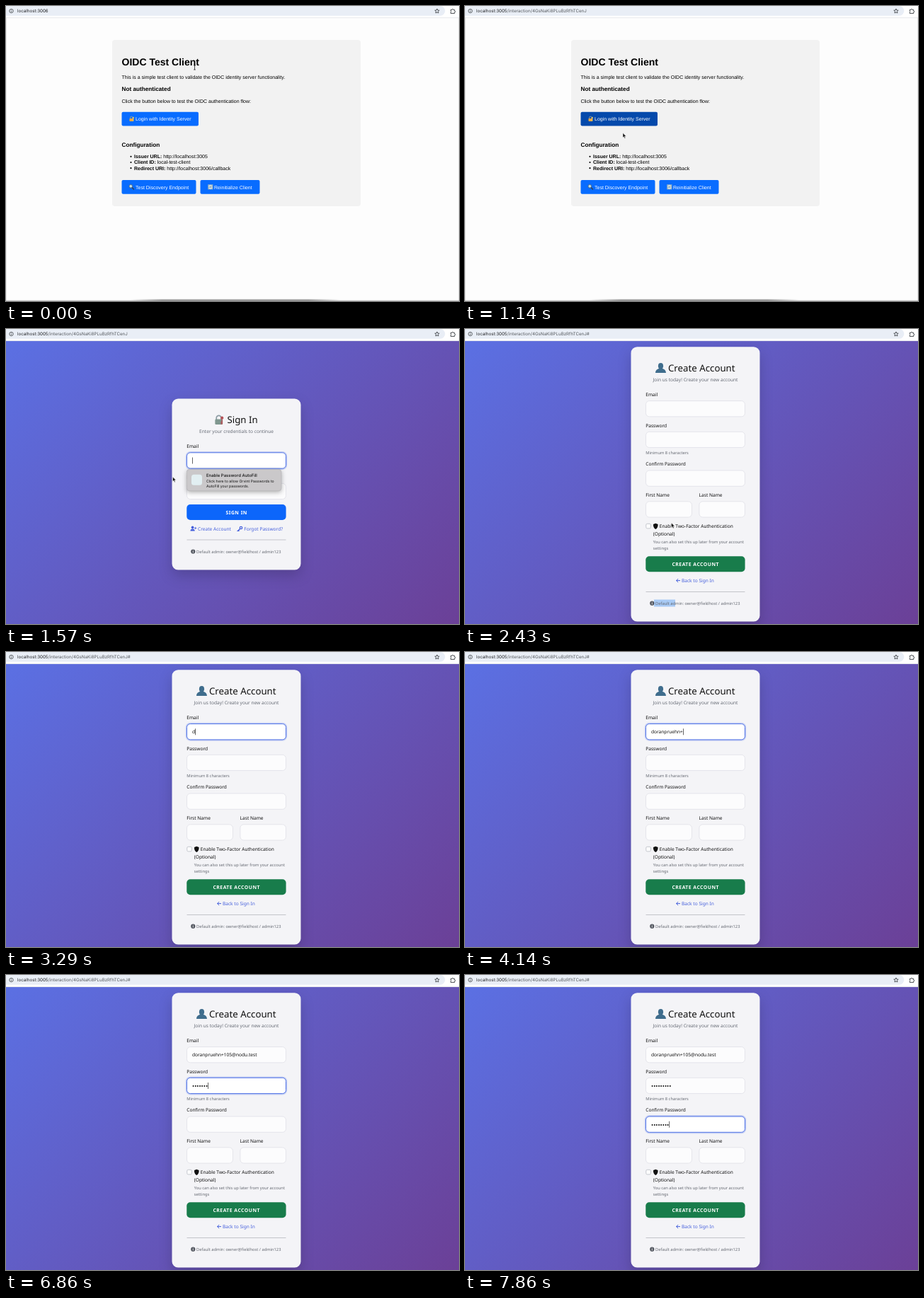
An HTML page that plays this animation: 640x417 px, repeating every 8000 ms.

```html
<!DOCTYPE html>
<html lang="en">
<head>
<meta charset="utf-8">
<title>Login flow</title>
<style>
  html, body { margin: 0; width: 100%; height: 100%; overflow: hidden; background: #fdfdfd; }
  svg { display: block; width: 100vw; height: 100vh; }
  text { text-rendering: geometricPrecision; white-space: pre; }
  .bar { font: 6.2px Inter, sans-serif; fill: #1f2124; }
  .bar tspan { fill: #55595e; }
  #client { font: 7px "Liberation Sans", Arial, sans-serif; fill: #000; }
  #client .h1 { font-size: 14px; font-weight: 700; }
  #client .h3 { font-size: 8.2px; font-weight: 700; }
  #client .btn text { fill: #fff; }
  .btn rect { fill: #086cff; }
  #login.hot rect { fill: #0449ab; }
  b, .b { font-weight: 700; }
  .form { font: 6.58px "Noto Sans", sans-serif; fill: #111; }
  .form .title { font-size: 13.25px; }
  .form .sub { fill: #676c76; }
  .form .small { font-size: 5.75px; fill: #666a73; }
  .form .link { fill: #4660dc; }
  .form .action { font-size: 6.9px; font-weight: 700; fill: #fff; letter-spacing: .45px; }
  .mid { text-anchor: middle; }
  .card { fill: #f4f4f7; filter: drop-shadow(0 8px 9px rgba(0,0,0,.17)); }
  .field { fill: #fcfcfd; stroke: #e2e3e9; stroke-width: .9; }
  .rule { stroke: #b7b8bf; stroke-width: .8; }
  .dots { font-size: 8.4px; }
  #popup { font: 5.2px Inter, sans-serif; fill: #111; }
  #popup .head { font-size: 5.97px; font-weight: 500; }
  #popup .panel { fill: #cac8ca; stroke: #a9a8ad; stroke-width: .5; filter: drop-shadow(0 2px 3px rgba(0,0,0,.3)); }
</style>
</head>
<body>
<svg viewBox="0 0 640 417" preserveAspectRatio="none">
  <defs>
    <linearGradient id="sky" gradientUnits="userSpaceOnUse" x1="60" y1="-43" x2="580" y2="477">
      <stop stop-color="#5b70e3"/><stop offset="1" stop-color="#6b4097"/>
    </linearGradient>
    <linearGradient id="dock">
      <stop stop-color="#999" stop-opacity="0"/><stop offset=".15" stop-color="#999"/>
      <stop offset=".85" stop-color="#999"/><stop offset="1" stop-color="#999" stop-opacity="0"/>
    </linearGradient>
    <symbol id="lock" viewBox="0 0 16 16" overflow="visible">
      <path d="M4 8V5a3.6 3.6 0 0 1 7.2 0v3" fill="none" stroke="#8c9ba3" stroke-width="1.8"/>
      <rect x="2" y="7" width="11.5" height="8" rx="1.4" fill="var(--body)"/>
      <circle cx="12.5" cy="5" r="2.3" fill="var(--key)"/>
      <path d="M12.5 7v7.5M12.5 11.5h-2M12.5 14h-2" stroke="var(--key)" stroke-width="1.5"/>
    </symbol>
    <symbol id="info" viewBox="-4 -4 8 8">
      <circle r="3.1" fill="#555962"/><path d="M0-.4V1.7M0-1.9v.8" stroke="#fff" stroke-width=".9"/>
    </symbol>
  </defs>

  <g id="client">
    <rect y="17" width="640" height="400" fill="#fdfdfd"/>
    <path d="M.4 17V417M639.6 17V417" stroke="#e4e4e4" stroke-width=".8"/>
    <path d="M0 416.4H640" stroke="#b5b5b5" stroke-width=".8"/>
    <rect x="176" y="414.6" width="296" height="2.4" fill="url(#dock)"/>
    <rect x="150" y="48" width="351" height="235" rx="4" fill="#f2f2f2"/>
    <text class="h1" x="163.5" y="83.6">OIDC Test Client</text>
    <text x="163.5" y="102.5">This is a simple test client to validate the OIDC identity server functionality.</text>
    <text class="h3" x="163.5" y="119.9">Not authenticated</text>
    <text x="163.5" y="136.7">Click the button below to test the OIDC authentication flow:</text>
    <g class="btn" id="login">
      <rect x="163.5" y="149.7" width="108.5" height="19.7" rx="2"/>
      <use href="#lock" x="173.5" y="155.5" width="8" height="8" style="--body:#f0a83c;--key:#e8c868"/>
      <text x="183" y="162.2">Login with Identity Server</text>
    </g>
    <text class="h3" x="163.5" y="199">Configuration</text>
    <g><circle cx="176.5" cy="212.8" r="1.1"/><circle cx="176.5" cy="221" r="1.1"/><circle cx="176.5" cy="229.2" r="1.1"/></g>
    <text x="181" y="215.1"><tspan class="b">Issuer URL:</tspan> http://localhost:3005</text>
    <text x="181" y="223.3"><tspan class="b">Client ID:</tspan> local-test-client</text>
    <text x="181" y="231.5"><tspan class="b">Redirect URI:</tspan> http://localhost:3006/callback</text>
    <g class="btn">
      <rect x="163.5" y="246" width="105" height="19.8" rx="2"/>
      <path d="M178 256.5l2.8 3" stroke="#3a4148" stroke-width="1.5"/>
      <circle cx="176.3" cy="254.8" r="2.3" fill="#bfe0ee" stroke="#59636b" stroke-width=".8"/>
      <text x="183" y="258.5">Test Discovery Endpoint</text>
    </g>
    <g class="btn">
      <rect x="274.5" y="246" width="84" height="19.8" rx="2"/>
      <path d="M285.3 252.3h7v7h-7z" fill="#9eb7c4"/>
      <path d="M286.7 255.5a2.1 2.1 0 0 1 4-.6M290.9 256.3a2.1 2.1 0 0 1-4 .6" fill="none" stroke="#fff" stroke-width=".9"/>
      <text x="294" y="258.5">Reinitialize Client</text>
    </g>
  </g>

  <rect id="backdrop" y="17" width="640" height="400" fill="url(#sky)"/>

  <g class="form" id="signin">
    <rect class="card" x="234.5" y="98.5" width="182" height="242" rx="8.7"/>
    <use href="#lock" x="293.5" y="121" width="15" height="15" style="--body:#7f978f;--key:#b65358"/>
    <text class="title" x="312.5" y="133.2">Sign In</text>
    <text class="sub mid" x="325.5" y="147.4">Enter your credentials to continue</text>
    <text x="255.3" y="168.2">Email</text>
    <text x="255.3" y="211.8">Password</text>
    <rect class="field" x="255.5" y="174.8" width="140" height="22.3" rx="5"/>
    <rect class="field" x="255.5" y="218.3" width="140" height="22.3" rx="5"/>
    <rect x="255.3" y="248" width="140.3" height="22" rx="5" fill="#0c66fa"/>
    <text class="action mid" x="325.7" y="261.6">SIGN IN</text>
    <g fill="#4660dc">
      <circle cx="263.6" cy="280.4" r="1.9"/>
      <path d="M260.4 285.6c0-4.2 6.4-4.2 6.4 0z"/>
      <path d="M267.7 279.8v3.4M266 281.5h3.4" stroke="#4660dc" stroke-width=".8"/>
      <circle cx="332" cy="281" r="1.7" fill="none" stroke="#4660dc" stroke-width="1.3"/>
      <path d="M330.8 282.2l-3.2 3.2h2" stroke="#4660dc" stroke-width="1.4" fill="none"/>
    </g>
    <text class="link" x="271" y="284.7">Create Account</text>
    <text class="link" x="336.3" y="284.7">Forgot Password?</text>
    <path class="rule" d="M255.5 298H395.5"/>
    <use href="#info" x="260.3" y="310.5" width="8" height="8"/>
    <text class="small" x="269" y="316.6">Default admin: owner@fieldhost / admin123</text>
  </g>

  <g class="form" id="create">
    <rect class="card" x="234.5" y="25.3" width="182" height="388.3" rx="8.7"/>
    <g fill="#3f6d8d"><ellipse cx="276.5" cy="52.3" rx="3.6" ry="4.4"/><path d="M269 62c.3-5 4-5.400 5.500-6.200h4c1.500.8 5.200 1.200 5.500 6.200z"/></g>
    <text class="title" x="287" y="60.2">Create Account</text>
    <text class="sub mid" x="325.5" y="74.2">Join us today! Create your new account</text>
    <text x="255.3" y="95.2">Email</text>
    <text x="255.3" y="138.9">Password</text>
    <text class="small" x="255.3" y="176.7">Minimum 8 characters</text>
    <text x="255.3" y="193.4">Confirm Password</text>
    <text x="255.3" y="237.3">First Name</text>
    <text x="330.6" y="237.3">Last Name</text>
    <g class="field">
      <rect x="255.5" y="101.6" width="140" height="22.3" rx="5"/>
      <rect x="255.5" y="145.3" width="140" height="22.3" rx="5"/>
      <rect x="255.5" y="200" width="140" height="22.3" rx="5"/>
      <rect x="255.5" y="243.8" width="65" height="22.3" rx="5"/>
      <rect x="330.9" y="243.8" width="64.600" height="22.3" rx="5"/>
      <rect x="255.8" y="275.300" width="6.600" height="6.600" rx="1.600" style="stroke:#bfc2c9"/>
    </g>
    <path d="M269.300 274.800l3.300 1.300c.2 3.500-1 5.800-3.300 7-2.300-1.200-3.500-3.500-3.300-7z"/>
    <text x="274.800" y="281.200">Enable Two-Factor Authentication</text>
    <text x="265.800" y="291.600">(Optional)</text>
    <text class="small" x="265.800" y="302.800">You can also set this up later from your account</text>
    <text class="small" x="265.800" y="312">settings</text>
    <rect x="255.300" y="321.300" width="140.300" height="22" rx="5" fill="#187c4b"/>
    <text class="action mid" x="325.700" y="334.900">CREATE ACCOUNT</text>
    <path d="M304 355.600h-5.400m2.500-2.500l-2.500 2.500 2.500 2.500" fill="none" stroke="#4660dc" stroke-width="1"/>
    <text class="link" x="306" y="357.900">Back to Sign In</text>
    <path class="rule" d="M255.500 371.500H395.500"/>
    <rect id="selection" x="267" y="382.500" width="30" height="10" fill="#a8caf5"/>
    <use href="#info" x="260.300" y="383.700" width="8" height="8"/>
    <text class="small" x="269" y="389.800">Default admin: owner@fieldhost / admin123</text>
  </g>

  <g id="focus">
    <rect x="254.600" y="-.9" width="141.800" height="24.100" rx="6" fill="none" stroke="#5b7bea" stroke-opacity=".3" stroke-width="2"/>
    <rect x="255.500" width="140" height="22.300" rx="5" fill="#fff" stroke="#4f72e6" stroke-width="1"/>
  </g>
  <g class="form" id="values">
    <text id="email" x="263" y="115.100"></text>
    <text id="pass" class="dots" x="263" y="160"></text>
    <text id="confirm" class="dots" x="263" y="214.700"></text>
  </g>
  <rect id="caret" width=".7" height="9" fill="#222"/>

  <g id="popup">
    <rect class="panel" x="255.300" y="198.300" width="133.700" height="30.500" rx="4"/>
    <rect x="262" y="205.800" width="15" height="15" rx="3.500" fill="#e2eff2"/>
    <text class="head" x="283" y="208.700">Enable Password AutoFill</text>
    <text x="283" y="217">Click here to allow Orvint Passwords to</text>
    <text x="283" y="224">AutoFill your passwords.</text>
  </g>

  <g class="bar">
    <rect width="640" height="17" fill="#fff"/>
    <path d="M0 0H613.500a6.800 6.800 0 0 1 0 13.700H0z" fill="#e9eef6"/>
    <path d="M0 16.600H640" stroke="#dfe1e5" stroke-width=".7"/>
    <circle cx="7.500" cy="7" r="2.700" fill="none" stroke="#3c4043" stroke-width=".8"/>
    <path d="M7.500 6.700v1.800M7.500 5.300v.7" stroke="#3c4043" stroke-width=".8"/>
    <text x="16" y="9.200"><tspan id="host" style="fill:#1f2124"></tspan><tspan id="path"></tspan></text>
    <path d="M609 3.900l.9 2.100 2.300.2-1.700 1.500.5 2.300-2-1.200-2 1.200.5-2.300-1.700-1.500 2.300-.2z" fill="none" stroke="#33373b" stroke-width=".8"/>
    <path d="M628.300 5.300h1.700a1 1 0 0 1 2 0h1.700v1.600a1 1 0 0 1 0 2v1.500h-5.400v-1.600a1 1 0 0 0 0-1.900z" fill="none" stroke="#33373b" stroke-width=".9"/>
  </g>

  <g id="cursor">
    <path id="arrow" d="M0 0V6.600L1.500 5.200 2.600 7.700 3.700 7.200 2.600 4.800H4.700Z" fill="#111" stroke="#fff" stroke-width=".5"/>
    <path id="hand" d="M-.8 0a.7.7 0 0 1 1.400 0v2.600l2.700.6c.6.2.8.6.7 1.200L3.500 7.500h-3.500L-2.300 4.600c-.3-.6.5-1 .9-.6l.6.500z" fill="#fff" stroke="#111" stroke-width=".6"/>
    <path id="beam" d="M-1.400-3h2.800M0-3V3M-1.400 3h2.800" fill="none" stroke="#222" stroke-width=".8"/>
  </g>
</svg>
<script>
const LOOP = 8000, STEP = 1000 / 7;
const EMAIL = 'doranpruehn+105@nodu.test';
const SIGN_IN = 9, CREATE = 17;
const $ = id => document.getElementById(id);
const show = (id, on) => { $(id).style.display = on ? '' : 'none'; };

// step, x, y, shape
const pointer = [
  [0, 266.5, 87, 'beam'], [1, 264, 91, 'beam'], [3, 243, 130, 'arrow'], [5, 224, 160, 'hand'],
  [7, 222, 162, 'hand'], [8, 223, 179.5, 'arrow'], [11, 235.5, 209, 'arrow'], [14, 288, 281, 'hand'],
  [17, 291.5, 274, 'arrow'], [18, 292, 262, 'arrow'], [20, 300, 117, 'beam'], [23, 300, 114, '']
];
// step, characters shown
const typed = {
  email: [[22, 0], [23, 1], [29, 12], [31, 12], [35, 16], [37, 16], [41, 20], [44, 25]],
  pass: [[45, 0], [49, 9]],
  confirm: [[51, 0], [55, 8]]
};
// step, top of the focused field, field name
const focus = [[SIGN_IN, 174.8, ''], [CREATE, null, ''], [20, 101.6, 'email'], [45, 145.3, 'pass'], [50, 200, 'confirm']];

const latest = (rows, s) => rows.filter(r => r[0] <= s).pop();

function between(rows, s, col) {
  const a = latest(rows, s) || rows[0];
  const b = rows.find(r => r[0] > s) || a;
  const k = b[0] > a[0] ? Math.max(0, (s - a[0]) / (b[0] - a[0])) : 0;
  return a[col] + (b[col] - a[col]) * k;
}

function drawPointer(s) {
  const shape = latest(pointer, s)[3];
  for (const id of ['arrow', 'hand', 'beam']) show(id, id === shape);
  $('cursor').setAttribute('transform', `translate(${between(pointer, s, 1)} ${between(pointer, s, 2)})`);
}

function drawFocus(s) {
  const [, top, name] = latest(focus, s) || [0, null, ''];
  show('focus', top !== null);
  show('caret', top !== null);
  if (top === null) return;
  $('focus').setAttribute('transform', `translate(0 ${top})`);
  const width = name && $(name).textContent ? $(name).getComputedTextLength() : 0;
  $('caret').setAttribute('x', 263.2 + width);
  $('caret').setAttribute('y', top + 6.7);
}

function draw(t) {
  const s = Math.floor((t + 5) / STEP);
  show('client', s < SIGN_IN);
  show('backdrop', s >= SIGN_IN);
  show('signin', s >= SIGN_IN && s < CREATE);
  show('popup', s > SIGN_IN && s < 16);
  show('create', s >= CREATE);
  show('values', s >= CREATE);
  show('selection', s < 20);
  $('login').classList.toggle('hot', s >= 4);
  $('host').textContent = s < 8 ? 'localhost:3006' : 'localhost:3005';
  $('path').textContent = s < 8 ? '' : '/interaction/4GsNaKi8PLuBzRfhTCenJ' + (s < CREATE ? '' : '#');
  for (const [id, rows] of Object.entries(typed)) {
    const n = Math.round(between(rows, s, 1));
    $(id).textContent = id === 'email' ? EMAIL.slice(0, n) : '•'.repeat(n);
  }
  drawFocus(s);
  drawPointer(s);
}

const start = performance.now();
function tick() {
  draw((performance.now() - start) % LOOP);
  requestAnimationFrame(tick);
}
tick();
</script>
</body>
</html>
```
